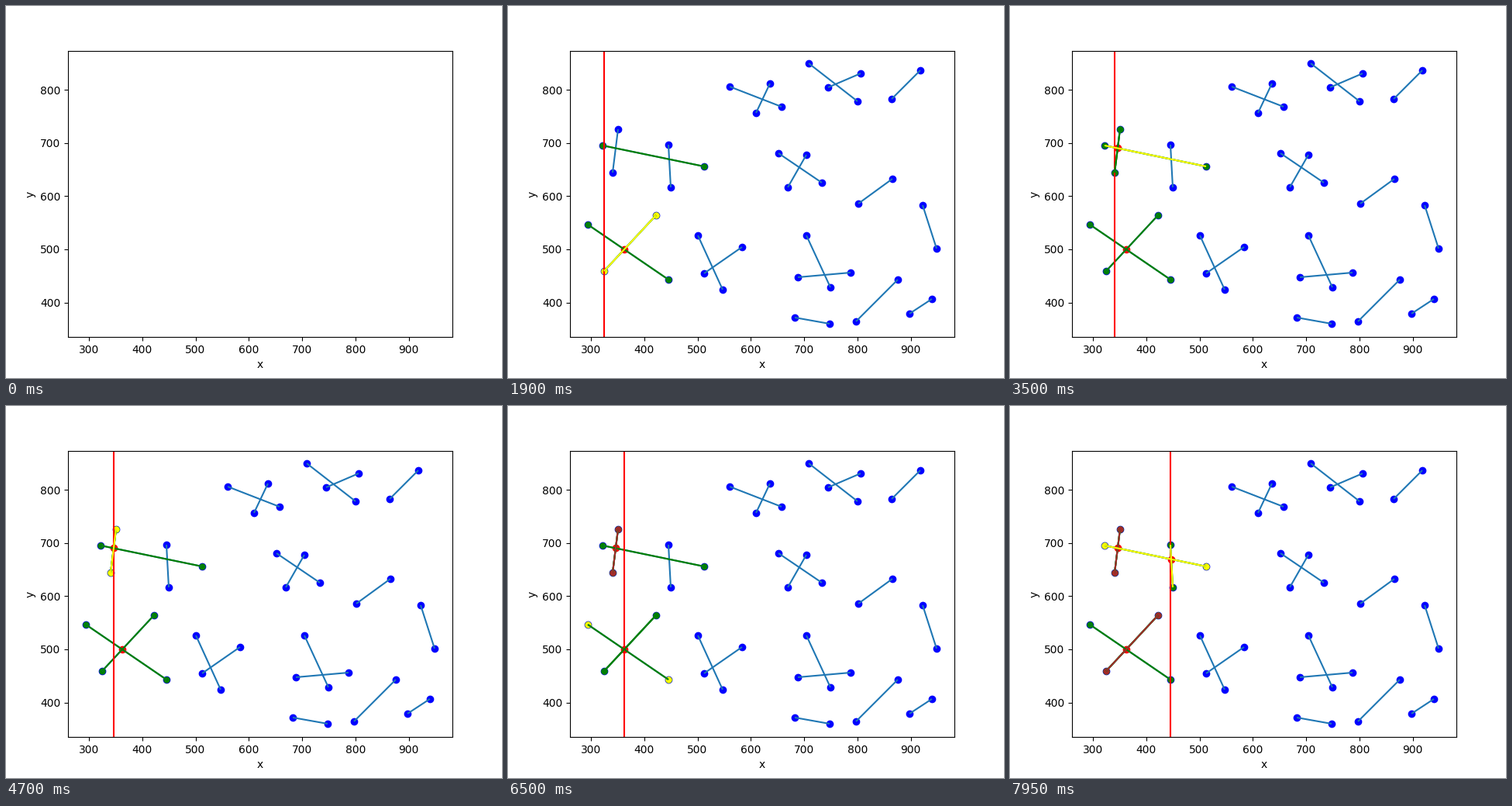
Recreate the animation shown at these times as a matplotlib script. Size 640 by 480 pixels, loop 8 s.

```python
import matplotlib.pyplot as plt
import numpy as np
from matplotlib.animation import FuncAnimation
from matplotlib.collections import LineCollection

FRAMES, INTERVAL = 160, 50
WIDTH, HEIGHT, DPI = 640, 480, 100

# The strokes to test, as drawn on the stage: left end, right end
STROKES = [
    (103, 282, 207, 353), (122, 180, 253, 207), (124, 342, 191, 270),
    (135, 215, 142, 159), (207, 179, 210, 234), (245, 296, 277, 366),
    (253, 345, 302, 311), (286, 104, 353, 130), (320, 138, 338, 100),
    (349, 190, 405, 228), (361, 234, 385, 192), (370, 402, 415, 410),
    (374, 350, 442, 344), (385, 296, 416, 363), (388, 74, 451, 123),
    (413, 105, 455, 87), (449, 407, 503, 353), (452, 255, 496, 223),
    (495, 120, 532, 83), (518, 397, 547, 378), (535, 257, 553, 313),
]

fig, ax = plt.subplots(figsize=(WIDTH / DPI, HEIGHT / DPI), dpi=DPI)
ax.set(xlim=(260.8, 981.9), ylim=(335, 873.5), xlabel="x", ylabel="y")
ax.set_autoscale_on(False)
to_data = ax.transData.inverted().transform
segments = [tuple(tuple(p) for p in to_data([(x1, HEIGHT - y1), (x2, HEIGHT - y2)]))
            for x1, y1, x2, y2 in STROKES]


def height_at(seg, x):
    (x1, y1), (x2, y2) = seg
    return y1 + (y2 - y1) * (x - x1) / (x2 - x1)


def crossing(s, t):
    """Point shared by two segments, or None."""
    p, q = np.array(s[0]), np.array(t[0])
    u, v = np.array(s[1]) - p, np.array(t[1]) - q
    k, m = np.linalg.solve(np.column_stack([u, -v]), q - p)
    return tuple(p + k * u) if 0 <= k <= 1 and 0 <= m <= 1 else None


class Sweep:
    """Runs the sweep-line search; every drawing step takes one frame."""

    def __init__(self):
        self.clock = 4
        self.shown = []  # (artist, first frame, frame after the last)
        self.active, self.tested = [], set()
        self.events = [(s[0][0], 0, "enter", (s,)) for s in segments]
        self.events += [(s[1][0], 1, "exit", (s,)) for s in segments]
        self.bar_x = None
        self.bar_start = 0

    def add_points(self, points, start, end=FRAMES, color="blue", size=36):
        dots = ax.scatter(*zip(*points), s=size, color=color, zorder=1 + start / 1000)
        self.shown.append((dots, start, end))

    def add_lines(self, lines, start, end=FRAMES, color="C0"):
        lines = LineCollection(lines, colors=color, zorder=2 + start / 1000)
        ax.add_collection(lines)
        self.shown.append((lines, start, end))

    def cover(self, seg, start, color, end=FRAMES):
        """Colour the ends, then the line; clear them in the same order."""
        self.add_points(seg, start, end, color, 25)
        self.add_lines([seg], start + 1, end + 1, color)

    def paint(self, seg, color):
        self.cover(seg, self.clock, color)
        self.clock += 2

    def flash(self, seg, hold):
        self.cover(seg, self.clock, "yellow", self.clock + hold)
        self.clock += hold + 2

    def move_bar(self, x):
        self.draw_bar(self.clock)
        self.bar_x, self.bar_start = x, self.clock + 1
        self.clock += 2

    def draw_bar(self, end):
        if self.bar_x is not None:
            ends = [(self.bar_x, y) for y in ax.get_ylim()]
            self.add_lines([ends], self.bar_start, end, "red")

    def neighbours(self, seg):
        """Untested segments right below and above."""
        i = self.active.index(seg)
        near = self.active[max(i - 1, 0):i] + self.active[i + 1:i + 2]
        return [s for s in near if frozenset((s, seg)) not in self.tested]

    def check(self, first, second):
        self.tested.add(frozenset((first, second)))
        self.flash(first, 2)
        start, clear = self.clock, self.clock + 4
        hit = crossing(first, second)
        if hit:
            self.add_points([hit], clear, color="red")
            self.events.append((hit[0], 0, "swap", (second, first)))
            clear += 1
        self.cover(first, start, "yellow", clear)
        self.cover(second, start + 2, "yellow", clear + 2)
        self.clock = clear + 4

    def enter(self, seg):
        lowest = self.active[0] == seg
        for other in self.neighbours(seg) or [None]:
            self.paint(seg, "green")
            if other:
                self.check(*((other, seg) if lowest else (seg, other)))

    def swap(self, *pair):
        for seg in pair:
            self.flash(seg, 10)
            for other in self.neighbours(seg):
                self.paint(seg, "green")
                self.check(seg, other)

    def run(self):
        self.add_lines(segments, 1)
        self.add_points([p for s in segments for p in s], 2)
        while self.clock < FRAMES:
            self.events.sort(key=lambda e: e[:2])
            x, _, kind, segs = self.events.pop(0)
            self.move_bar(x)
            if kind == "enter":
                self.active += segs
            elif kind == "exit":
                self.active.remove(segs[0])
            self.active.sort(key=lambda s: height_at(s, x + 0.01))
            if kind == "enter":
                self.enter(*segs)
            elif kind == "swap":
                self.swap(*segs)
            else:
                self.paint(segs[0], "brown")
        self.draw_bar(FRAMES)
        return self.shown


shown = Sweep().run()


def update(n):
    for artist, start, end in shown:
        artist.set_visible(start <= n < end)
    return [artist for artist, _, _ in shown]


anim = FuncAnimation(fig, update, frames=FRAMES, interval=INTERVAL,
                     repeat=True, repeat_delay=0, init_func=lambda: update(0))
plt.show()
```
